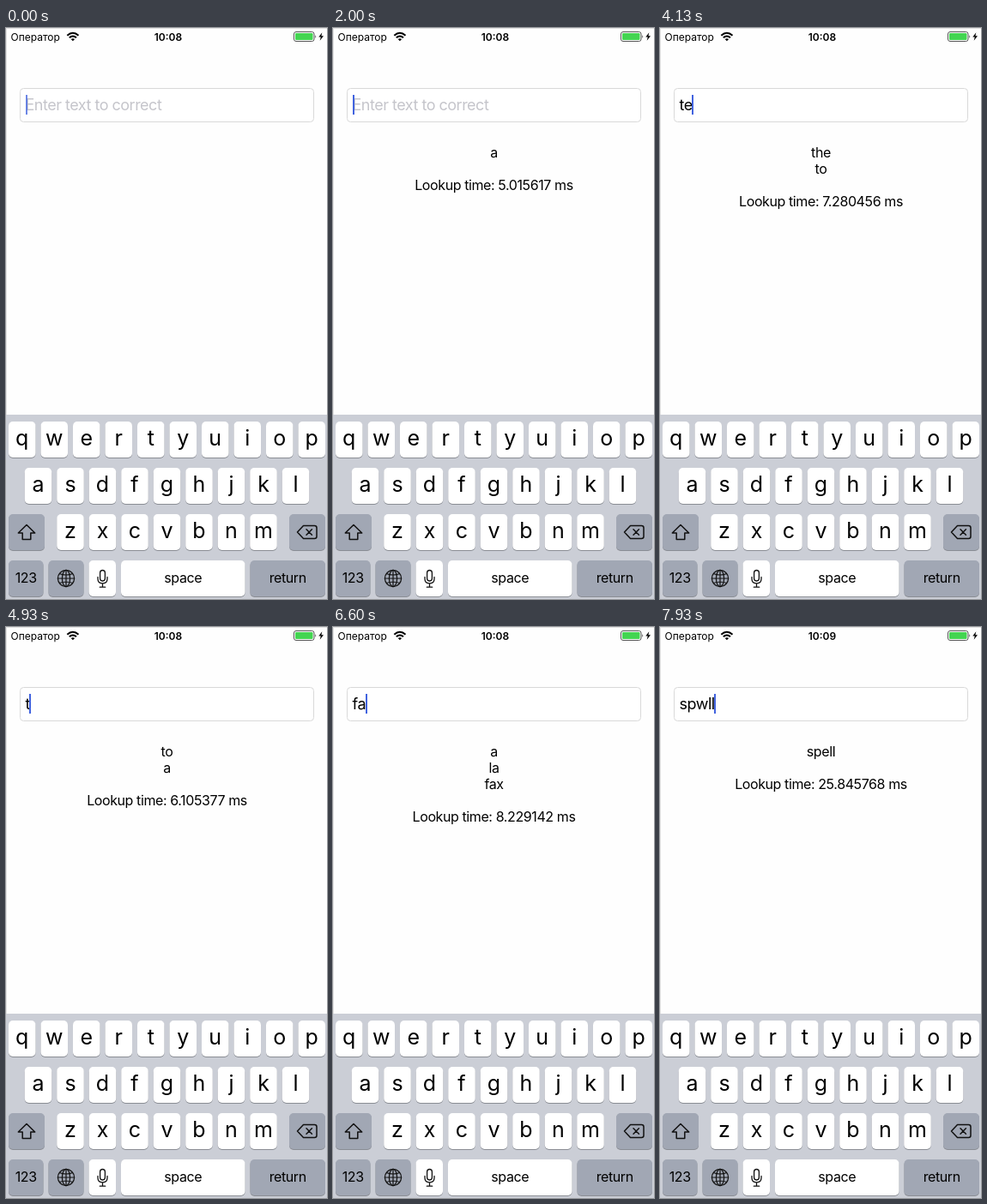
An HTML page that plays this animation: 374x666 px, repeating every 8000 ms.

```html
<!DOCTYPE html>
<html lang="en">
<head>
<meta charset="utf-8">
<title>Spelling lookup</title>
<style>
  html, body { margin: 0; width: 100%; height: 100%; overflow: hidden; background: #fefefe; }
  svg { display: block; width: 374px; height: 666px; font-family: Inter, Roboto, sans-serif; }
  .status { font-size: 12px; }
  .clock { font-weight: 600; text-anchor: middle; }
  .field { font-size: 18px; letter-spacing: -.5px; }
  .hint { fill: #c5c5cb; }
  .result, .label { font-size: 16px; letter-spacing: -.4px; text-anchor: middle; }
  .letter { font-size: 25px; text-anchor: middle; }
  .line { fill: none; stroke: #111; stroke-width: 1.5; stroke-linejoin: round; stroke-linecap: round; }
</style>
</head>
<body>
<svg viewBox="0 0 374 666">
  <rect width="374" height="666" fill="#fefefe"/>
  <path d="M0 .5H374M.5 0V451" stroke="#e2e2e2"/>

  <g class="status">
    <text x="5.5" y="14.5">Оператор</text>
    <text id="clock" class="clock" x="189" y="14.5"></text>
  </g>
  <g fill="none" stroke="#000" stroke-width="2">
    <path d="M71.3 8.8Q77.9 2.8 84.5 8.8M73.8 11.3Q77.9 7.7 82 11.3"/>
    <path d="M77.9 15.2L75.7 13Q77.9 11.3 80.1 13Z" fill="#000" stroke="none"/>
  </g>
  <rect x="335.5" y="4.5" width="23.5" height="11" rx="2.5" fill="#fff" stroke="#555"/>
  <rect x="337" y="6" width="20.5" height="8" rx="1.2" fill="#43d551"/>
  <path d="M360.3 8.2Q362.2 10 360.3 11.8Z" fill="#555"/>
  <path d="M368.3 5.2L364.3 10.6H366.8L365.7 14.8L370 9.2H367.4Z"/>

  <rect x="16.5" y="70.5" width="342" height="39" rx="4" fill="#fff" stroke="#d9d9d9"/>
  <text id="hint" class="field hint" x="22.5" y="96.3">Enter text to correct</text>
  <text id="typed" class="field" x="22.5" y="96.3"></text>
  <rect id="cursor" y="78" width="2" height="23" fill="#4163df"/>
  <g id="results"></g>

  <rect y="451" width="374" height="215" fill="#cbced6"/>
  <g id="keys"></g>
  <g class="line">
    <path d="M24 579.5L33.7 589H28.8V596.5H19.2V589H14.3Z"/>
    <path d="M346.5 580.5H359.5Q362 580.5 362 583V593Q362 595.5 359.5 595.5H346.5L339.5 588ZM350 584.8L356.4 591.2M356.4 584.8L350 591.2"/>
    <g stroke-width="1.2">
      <circle cx="70" cy="642" r="9.6"/>
      <ellipse cx="70" cy="642" rx="4.6" ry="9.6"/>
      <path d="M70 632.4V651.6M60.4 642H79.6M62.4 636.5Q70 639.5 77.6 636.5M62.4 647.5Q70 644.5 77.6 647.5"/>
    </g>
    <rect x="109.6" y="632.5" width="5.8" height="12.5" rx="2.9" stroke-width="1.3"/>
    <path d="M107 640.5V642.5Q107 647.8 112.5 647.8T118 642.5V640.5M112.5 648V652M109.3 652.2H115.7" stroke-width="1.3"/>
  </g>
</svg>

<script>
const TICKS_PER_MS = 15 / 1000;
const LOOP = 8000;
const $ = id => document.getElementById(id);

function add(parent, tag, attrs, text = '') {
  const node = document.createElementNS('http://www.w3.org/2000/svg', tag);
  for (const name in attrs) node.setAttribute(name, attrs[name]);
  node.textContent = text;
  parent.append(node);
}

function addKey(x, y, width, dark, label = '', style = 'label') {
  const box = { x, width, height: 42, rx: 5 };
  add($('keys'), 'rect', { ...box, y: y + 1, fill: '#8a8d94' });
  add($('keys'), 'rect', { ...box, y, fill: dark ? '#a1a7b4' : '#fff' });
  const baseline = y + (style === 'letter' ? 27.7 : 26.3);
  add($('keys'), 'text', { class: style, x: x + width / 2, y: baseline }, label);
}

function addRow(letters, left, y) {
  [...letters].forEach((c, i) => addKey(left + i * 37.5, y, 31.5, false, c, 'letter'));
}

addRow('qwertyuiop', 3, 459);
addRow('asdfghjkl', 21.75, 513);
addRow('zxcvbnm', 59.25, 567);
addKey(3, 567, 42, true);
addKey(330, 567, 42, true);
addKey(3, 621, 40.5, true, '123');
addKey(49.5, 621, 41, true);
addKey(96.5, 621, 31.5, false);
addKey(134, 621, 144.5, false, 'space');
addKey(284.5, 621, 87.5, true, 'return');

// Each edit: tick, typed text, suggestions, lookup time
const edits = [
  [-8.2, '', '', ''],
  [12, 't', 'to a', '5.066412'],
  [13, 'teh', 'the', '9.412083'],
  [25, 'te', 'the to', '7.318264'],
  [27, 't', 'to a', '5.284907'],
  [30, '', 'a', '5.015617'],
  [32, 'n', 'a in', '5.320648'],
  [36, 'nd', 'and', '7.604285'],
  [49, 'n', 'a in', '5.264803'],
  [51, '', 'a', '5.098807'],
  [60, 't', 'to a', '5.402683'],
  [62, 'te', 'the to', '7.280456'],
  [64, 'teh', 'the', '9.603842'],
  [72, 'te', 'the to', '7.462085'],
  [74, 't', 'to a', '6.105377'],
  [76, '', 'a', '5.048263'],
  [81, 'f', 'of a', '5.380624'],
  [83, 'fa', 'a la fax', '8.064825'],
  [85, 'fas', 'fast fax', '12.480653'],
  [87, 'fasr', 'fast', '18.206438'],
  [97, 'fas', 'fast fax', '12.604825'],
  [99, 'fa', 'a la fax', '8.229142'],
  [101, 'f', 'of a', '5.420683'],
  [104, '', 'a', '5.062845'],
  [110, 's', 'a so', '5.460238'],
  [112, 'sp', 'so up', '8.204653'],
  [115, 'spw', 'spa', '13.082645'],
  [117, 'spwl', 'spell', '19.426803'],
  [119, 'spwll', 'spell', '25.845768']
];

// The cursor rests after each edit, then fades out and back in
function cursorOpacity(age) {
  const p = age % 15;
  if (p < 7.5) return 1;
  if (p < 10.5) return 1 - (p - 7.5) / 3;
  return Math.max(0, (p - 13) / 2);
}

let shown;
function showEdit(edit) {
  if (edit === shown) return;
  shown = edit;
  const [, text, words, time] = edit;
  $('typed').textContent = text;
  $('hint').style.display = text ? 'none' : '';
  $('results').replaceChildren();
  if (!time) return;
  const lines = [...words.split(' '), '', `Lookup time: ${time} ms`];
  lines.forEach((line, i) =>
    add($('results'), 'text', { class: 'result', x: 187.5, y: 150.5 + 19 * i }, line));
}

function draw() {
  const tick = Math.floor((performance.now() % LOOP) * TICKS_PER_MS + 0.1);
  const edit = edits.findLast(([start]) => start <= tick);
  showEdit(edit);
  const end = edit[1] ? 22.5 + $('typed').getComputedTextLength() : 23;
  $('cursor').setAttribute('x', Math.floor(end));
  $('cursor').setAttribute('opacity', cursorOpacity(tick - edit[0]));
  $('clock').textContent = tick < 118 ? '10:08' : '10:09';
  requestAnimationFrame(draw);
}
draw();
</script>
</body>
</html>
```
